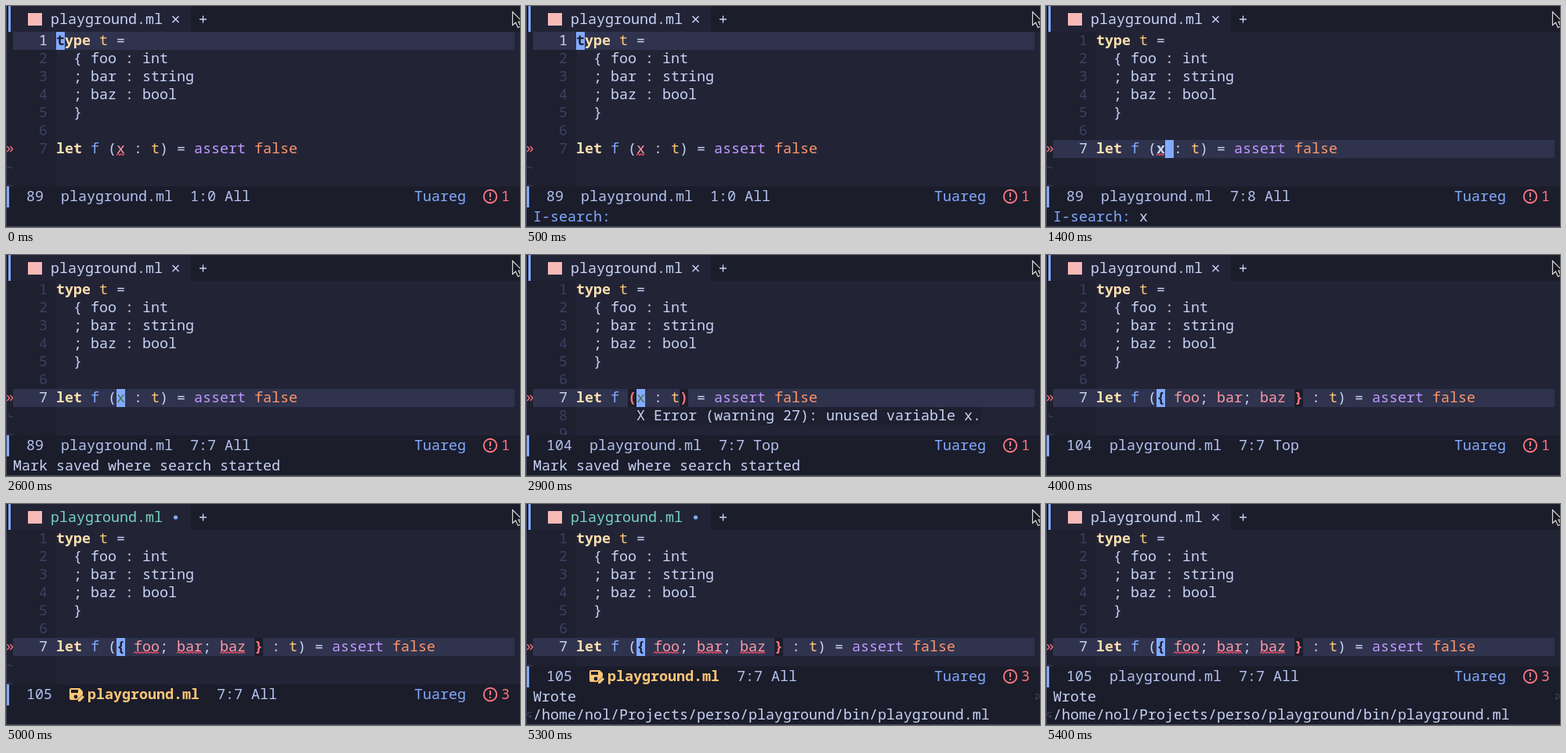
These frames come from a looping animation (656 by 282 pixels, 8 s). An HTML page:

```html
<!DOCTYPE html>
<html lang="en">
<head>
<meta charset="utf-8">
<title>Editor: destructuring a record</title>
<style>
html, body { margin: 0; width: 100%; height: 100%; overflow: hidden; background: #222436; }
svg { display: block; width: 656px; height: 282px; }
text { font: 18.333px "Noto Sans Mono", "DejaVu Sans Mono", monospace; white-space: pre; }
.b { font-weight: 700; }
</style>
</head>
<body>
<svg id="stage" viewBox="0 0 656 282"></svg>
<script>
const LOOP = 8000, CELL = 11, ROW = 23, LEFT = 64, TOP = 33;
const C = {
  bg: '#222436', gutter: '#1e2030', dark: '#1b1d2b', line: '#2f334d', num: '#3b4062',
  fg: '#c8d3f5', mode: '#b4c2f0', blue: '#82aaff', key: '#ffdfae', yellow: '#ffc777',
  purple: '#c099ff', orange: '#ff966c', red: '#ff757f', pink: '#ff98a4', teal: '#77d5be',
  wave: '#f0506a', faint: '#444a6d', icon: '#f9b9b7'
};
const stage = document.getElementById('stage');

const rect = (x, y, w, h, fill) => `<rect x="${x}" y="${y}" width="${w}" height="${h}" fill="${fill}"/>`;
const stroke = (d, color, w = 1) => `<path d="${d}" fill="none" stroke="${color}" stroke-width="${w}"/>`;
const text = (x, y, s, color, bold) =>
  `<text x="${x}" y="${y}" fill="${color}"${bold ? ' class="b"' : ''}>${s}</text>`;
const rowY = n => TOP + (n - 1) * ROW;
const colX = c => LEFT + c * CELL;
const block = (row, col, fill) => rect(colX(col), rowY(row), CELL, ROW, fill);

// A code row built from [string, colour, bold] runs.
function code(row, runs) {
  let col = 0, out = '';
  for (const [s, color = C.fg, bold] of runs) {
    out += text(colX(col), rowY(row) + 17, s, color, bold);
    col += s.length;
  }
  return out;
}

function wave(col, len) {
  let d = `M${colX(col)} 190.5`;
  for (let i = 0; i < len * CELL / 2 - 1; i++) d += `l2 ${i % 2 ? 2 : -2}`;
  return stroke(d, C.wave, 1.1);
}

function stateAt(t) {
  const edited = t >= 4000;
  return {
    edited,
    search: t >= 1400 && t < 2600,
    row: t < 1400 ? 1 : 7,
    col: t < 1400 ? 0 : t < 2600 ? 8 : 7,
    parens: t >= 2700 && !edited,
    popup: t >= 2900 && !edited,
    dirty: t >= 4100 && t < 5400,
    size: t < 2900 ? '89' : t < 4100 ? '104' : '105',
    pos: (t < 1400 ? '1:0' : t < 2600 ? '7:8' : '7:7') + (t >= 2900 && t < 4100 ? ' Top' : ' All'),
    errors: t < 5000 ? 1 : 3,
    lift: t < 5300 ? 0 : ROW,
    echo: t < 500 ? [] : t < 1400 ? ['I-search:'] : t < 2600 ? ['I-search:', ' x']
      : t < 3100 ? ['', 'Mark saved where search started']
      : t < 3300 ? ['', 'Error (warning 27): unused variable x.']
      : t < 4000 ? ['', 'C-c-'] : []
  };
}

function tabBar(s) {
  return rect(0, 0, 656, TOP, C.dark) + rect(3, 0, 233, TOP, C.bg) + rect(3, 0, 3, TOP, C.blue) +
    rect(28, 9, 18, 16, C.icon) +
    text(57, 23, 'playground.ml', s.dirty ? C.teal : C.fg) +
    (s.dirty ? `<circle cx="216.5" cy="17" r="2.6" fill="${C.blue}"/>`
      : stroke('M212.5 13l8 8m0 -8l-8 8', C.fg, 1.5)) +
    stroke('M247 17h9m-4.5 -4.5v9', C.fg, 1.4);
}

function buffer(s) {
  let out = rect(0, TOP, LEFT, 197, C.gutter) + rect(9, rowY(s.row), 640, ROW, C.line);
  for (let n = 1; n <= (s.popup ? 9 : 7); n++)
    out += text(42, rowY(n) + 17, n, n === s.row ? C.fg : C.num);

  if (s.parens) out += block(7, 6, C.dark) + block(7, 12, C.dark);
  if (s.edited) out += block(7, 23, C.dark);
  out += block(s.row, s.col, C.blue);

  const atStart = s.row === 1;
  out += code(1, [['t', atStart ? C.bg : C.key, 1], ['ype', C.key, 1], [' '], ['t', C.yellow], [' =']]);
  ['{ foo : int', '; bar : string', '; baz : bool', '}'].forEach((l, i) => {
    out += code(i + 2, [['  '], [l]]);
  });

  const paren = s.parens ? [C.red, 1] : [];
  const pattern = s.edited
    ? [['{', C.dark, 1], [' '], ['foo', C.pink], ['; '], ['bar', C.pink], ['; '], ['baz', C.pink], [' '], ['}', C.red, 1]]
    : [s.search ? ['x', C.fg, 1] : ['x', s.col === 7 ? '#53704f' : C.pink]];
  out += code(7, [['let', C.key, 1], [' '], ['f', C.blue], [' '], ['(', ...paren], ...pattern,
    [' : '], ['t', C.yellow], [')', ...paren], [' = '], ['assert', C.purple], [' '], ['false', C.orange]]);

  if (!s.edited && s.col !== 7) out += wave(7, 1);
  if (s.errors === 3) out += wave(9, 3) + wave(14, 3) + wave(19, 3);
  if (s.popup)
    out += rect(colX(7), rowY(8), 440, ROW, C.gutter) +
      text(colX(7), rowY(8) + 17, 'X Error (warning 27): unused variable x.', C.fg);
  else
    for (const y of [206, 229]) out += stroke(`M1.5 ${y}q2 -2 3.5 0t3.5 0`, C.faint);
  return out + stroke('M1.5 179l3 3.5l-3 3.5m4 -7l3 3.5l-3 3.5', C.red, 1.3);
}

const saveIcon = `<path d="M83 235h11l4 4v4l-7 7h-8q-2 0 -2 -2v-11q0 -2 2 -2z" fill="${C.yellow}"/>` +
  rect(83, 237, 9, 4, C.dark) + `<circle cx="89" cy="246" r="2.4" fill="${C.dark}"/>` +
  `<path d="M92 252v-2.5l5.5 -5.5l2.5 2.5l-5.5 5.5z" fill="${C.yellow}"/>`;

function modeLine(s) {
  let x = 26 + (s.size.length + 2) * CELL, out = rect(0, 230, 656, 52, C.dark) + rect(1, 230, 3, 27, C.blue);
  out += text(26, 249, s.size, C.mode);
  if (s.dirty) { out += saveIcon; x += 23; }
  out += text(x, 249, 'playground.ml', s.dirty ? C.yellow : C.mode, s.dirty) +
    text(x + 15 * CELL, 249, s.pos, C.mode) +
    text(521, 249, 'Tuareg', C.blue) +
    `<circle cx="618" cy="243" r="8.2" fill="none" stroke="${C.red}" stroke-width="1.9"/>` +
    rect(617, 238, 2, 6, C.red) + rect(617, 246, 2, 2, C.red) +
    text(632, 249, s.errors, C.red);
  return `<g transform="translate(0 ${-s.lift})">${out}</g>`;
}

function echoArea(s) {
  let out = rect(0, 259 - s.lift, 656, 23 + s.lift, C.dark);
  if (s.lift)
    return out + text(9, 252, 'Wrote', C.fg) +
      text(9, 275, '/home/nol/Projects/perso/playground/bin/playground.ml', C.fg) +
      stroke('M650 243h3q2 0 2 2.500t-2 2.500h-3m2 -2l-2 2l2 2', C.faint) +
      stroke('M7 266h-3q-2 0 -2 2.500t2 2.500h3m-2 -2l2 2l-2 2', C.faint);
  const [prompt = '', msg = ''] = s.echo;
  return out + text(9, 275, prompt, C.blue) + text(9 + prompt.length * CELL, 275, msg, C.fg);
}

const frame = rect(0, 0, 1, 282, '#454a5c') + rect(0, 281, 656, 1, '#454a5c');
const pointer = `<path d="M646.500 7.500v17l4 -3.500l3 6.500l3.500 -1.500l-3 -6h5z" fill="#17181f" stroke="#dcdcdc" stroke-width="1.2"/>`;

let shown = '';
function draw(t) {
  const s = stateAt(t), key = JSON.stringify(s);
  if (key === shown) return;
  shown = key;
  stage.innerHTML = rect(0, 0, 656, 282, C.bg) + buffer(s) + tabBar(s) + modeLine(s) + echoArea(s) + frame + pointer;
}

const start = performance.now();
function tick() {
  draw((performance.now() - start) % LOOP);
  requestAnimationFrame(tick);
}
tick();
</script>
</body>
</html>
```
